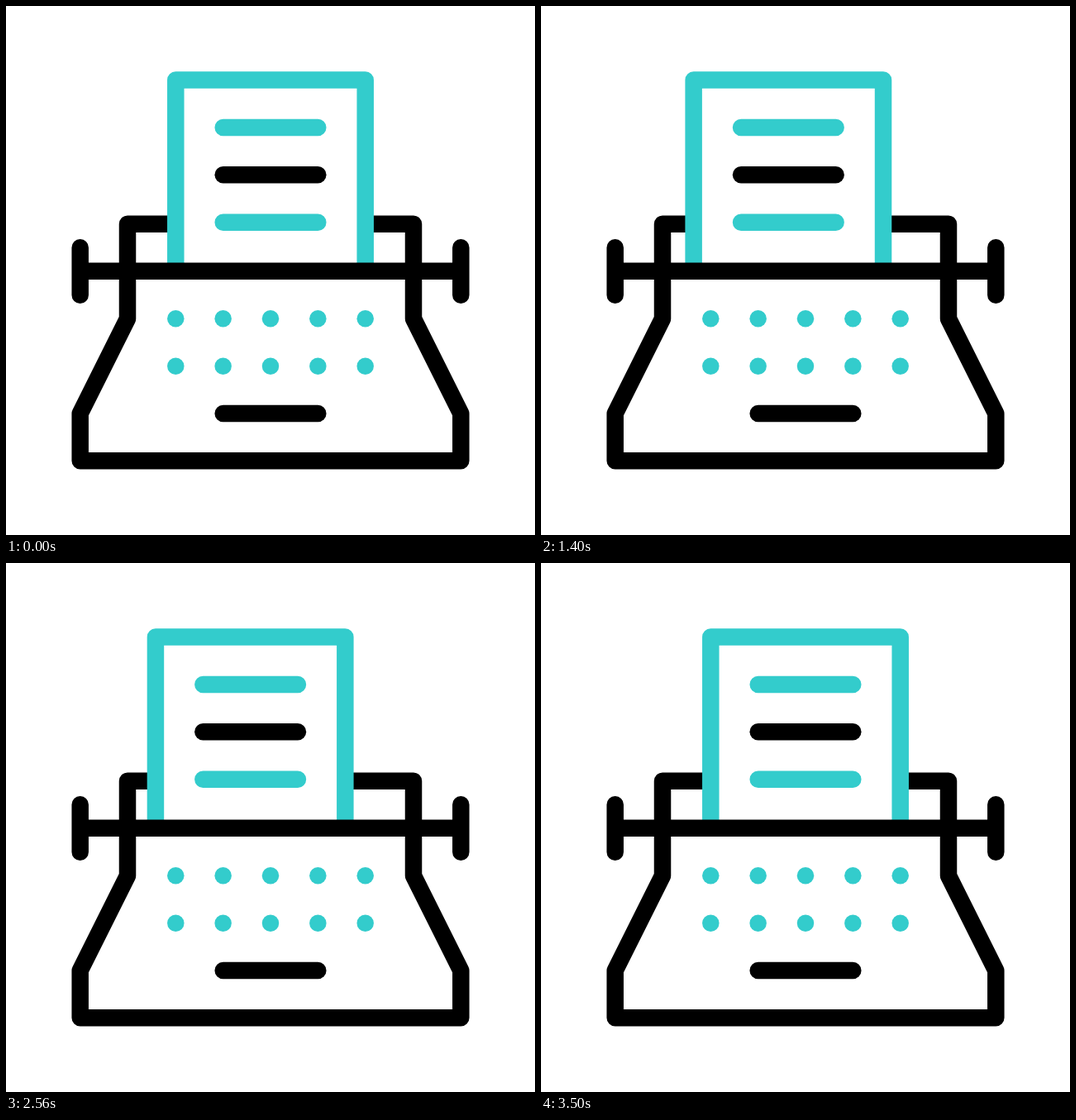
These frames come from a looping animation (640 by 640 pixels, 3600 ms). An HTML page:

```html
<!DOCTYPE html>
<html>
<head>
<meta charset="utf-8">
<style>
html, body { margin: 0; height: 100%; overflow: hidden; background: #fff; }
svg { display: block; width: 100vw; height: 100vh; }
</style>
</head>
<body>
<svg viewBox="0 0 640 640" fill="none" stroke="#000" stroke-width="20.5" stroke-linecap="round" stroke-linejoin="round">
  <path d="M147 263.7H493V378.3L550.3 493V550.3H89.7V493L147 378.3Z"/>
  <g id="paper" stroke="#3cc">
    <path fill="#fff" d="M205.3 320V89.6H434.7V320"/>
    <path d="M262.7 147H377.3M262.7 261.7H377.3"/>
    <path stroke="#000" d="M262.7 204.3H377.3"/>
  </g>
  <path d="M89.7 320.8H550.3M89.7 292.2V349.7M550.3 292.2V349.7"/>
  <g id="keys" fill="#3cc" stroke="none"></g>
  <path id="space" d="M262.7 493H377.3"/>
</svg>
<script>
const LOOP = 3600, STEP = 20, ROUND = 1060, ADVANCE = 2.583;
const paper = document.getElementById('paper');
const keys = document.getElementById('keys');
const space = document.getElementById('space');

const dots = [];
for (let i = 0; i < 10; i++) {
  const dot = document.createElementNS('http://www.w3.org/2000/svg', 'circle');
  dot.setAttribute('cx', 205.3 + i % 5 * 57.35);
  dot.setAttribute('cy', i < 5 ? 378.2 : 435.7);
  dot.setAttribute('r', 10.25);
  keys.append(dot);
  dots.push(dot);
}

// One typed round: start time, key index, travel. It is typed twice.
const word = [[120, 8, 17], [260, 1, 11.4], [420, 4, 11.4], [640, 9, 11.4], [820, 2, 11.4], [1020, 6, 11.4]];
const presses = [0, ROUND].flatMap(d => word.map(([at, key, drop]) => ({ at: at + d, key, drop })));
const spaces = [1100, 1100 + ROUND, 3420];

const clamp = v => Math.max(0, Math.min(1, v));
const press = (t, at) => clamp(1 - Math.abs(t - at - 40) / 40);
const shift = (el, x, y) => el.setAttribute('transform', `translate(${x} ${y})`);

function draw(now) {
  const t = Math.floor(now % LOOP / STEP) * STEP;
  const drops = dots.map(() => 0);
  let typed = 0;
  for (const { at, key, drop } of presses) {
    drops[key] += drop * press(t, at);
    typed += clamp((t - at) / 40);
  }
  const carriage = 1 - clamp((t - 2440) / 560);
  shift(paper, -ADVANCE * typed * carriage, 0);
  dots.forEach((dot, i) => shift(dot, 0, drops[i]));
  shift(space, 0, 7.8 * Math.max(...spaces.map(at => press(t, at))));
}

const start = performance.now();
function tick() {
  draw(performance.now() - start);
  requestAnimationFrame(tick);
}
tick();
</script>
</body>
</html>
```
